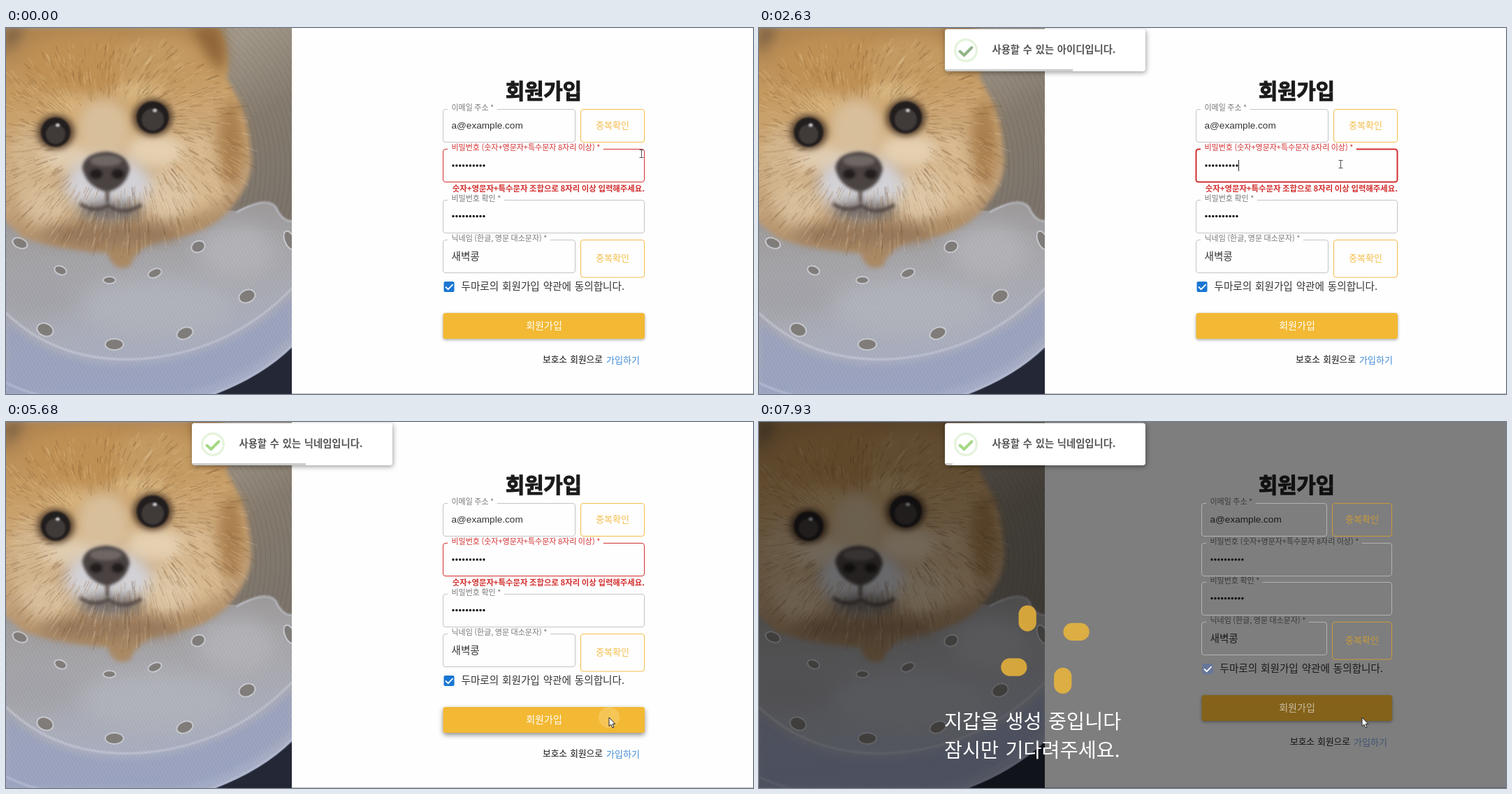
These frames come from a looping animation (1069x524 px, 8000 ms). An HTML page with a canvas:

```html
<!DOCTYPE html>
<html lang="ko">
<head>
<meta charset="utf-8">
<title>회원가입</title>
<style>
html, body { margin: 0; width: 100%; height: 100%; overflow: hidden; background: #fefefe; }
canvas { display: block; }
</style>
</head>
<body>
<canvas id="stage" width="1069" height="524"></canvas>
<script>
const W = 1069, H = 524, LOOP = 8000, TAU = Math.PI * 2;
const ctx = document.getElementById('stage').getContext('2d');
const KR = '"Noto Sans CJK KR", "Noto Sans CJK", sans-serif';
const LATIN = '"Liberation Sans", Arial, sans-serif';

const CLICK_MAIL = 930, CLICK_NICK = 3660, CLICK_JOIN = 5600;
const TOASTS = [
  { at: 1096, text: '사용할 수 있는 아이디입니다.' },
  { at: 3845, text: '사용할 수 있는 닉네임입니다.' }
];
const TOAST_LIFE = 4248, FOCUS = 2200, BLUR = CLICK_NICK, DIM_AT = 5820, WAIT_AT = 5960;

const LIGHT = {
  bg: '#fefefe', left: 625, right: 914, mid: 815, shift: 0, line: '#c4c4c4', label: '#777',
  ink: '#333', title: '#1b1b1b', gold: '#f3bd4a', join: '#f3b934', joinText: '#fff',
  error: '#d32f2f', box: '#1976d2', link: '#3f8bd6'
};
const DIM = {
  bg: '#7f7f7f', left: 633, right: 906, mid: 813, shift: -17, line: '#b2b2b2', label: '#383838',
  ink: '#1a1a1a', title: '#111', gold: '#c99a3a', join: '#84621a', joinText: '#c9bfa8',
  box: '#66779c', link: '#3f5473'
};

const clamp = (v, a = 0, b = 1) => Math.min(b, Math.max(a, v));
const mix = (a, b, p) => a + (b - a) * p;
const smooth = p => { p = clamp(p); return p * p * (3 - 2 * p); };

function bezier(x1, y1, x2, y2) {
  const at = (a, b, u) => 3 * a * u * (1 - u) ** 2 + 3 * b * u * u * (1 - u) + u ** 3;
  return x => {
    let lo = 0, hi = 1;
    for (let i = 0; i < 18; i++) {
      const m = (lo + hi) / 2;
      if (at(x1, x2, m) < x) lo = m; else hi = m;
    }
    return at(y1, y2, lo);
  };
}
const ease = bezier(.25, .1, .25, 1);
const easeInOut = bezier(.4, 0, .2, 1);

function label(str, x, y, size, weight, color, align = 'left', family = KR) {
  ctx.font = `${weight} ${size}px ${family}`;
  ctx.wordSpacing = size > 12 ? `${size * .11}px` : '0px';
  ctx.textAlign = align;
  ctx.fillStyle = color;
  ctx.fillText(str, x, y);
}

function box(c, x, y, w, h, r) {
  c.beginPath();
  c.roundRect(x, y, w, h, r);
}

function oval(c, x, y, rx, ry, color, turn = 0) {
  c.fillStyle = color;
  c.beginPath();
  c.ellipse(x, y, rx, ry, turn, 0, TAU);
  c.fill();
}

function shadow(color, blur, dx, dy) {
  ctx.shadowColor = color;
  ctx.shadowBlur = blur;
  ctx.shadowOffsetX = dx;
  ctx.shadowOffsetY = dy;
}

// Soft portrait of the dog in its plastic cone, painted once.
function paintPhoto() {
  const cv = document.createElement('canvas');
  cv.width = 409;
  cv.height = H;
  const c = cv.getContext('2d');
  let seed = 7;
  const rnd = () => (seed = seed * 16807 % 2147483647) / 2147483647;
  const blur = n => { c.filter = n ? `blur(${n}px)` : 'none'; };
  const shape = (d, color) => { c.fillStyle = color; c.fill(new Path2D(d)); };
  const ramp = (x0, y0, x1, y1, ...cols) => {
    const g = c.createLinearGradient(x0, y0, x1, y1);
    cols.forEach((k, i) => g.addColorStop(i / (cols.length - 1), k));
    return g;
  };

  c.fillStyle = ramp(290, 40, 410, 230, '#a2988a', '#857b6e', '#7d756c');
  c.fillRect(0, 0, 410, H);
  c.lineWidth = 1;
  c.strokeStyle = 'rgba(60,52,45,.14)';
  for (let i = 0; i < 26; i++) {
    c.beginPath();
    c.arc(150, 200, 180 + i * 7, -1.2, .3);
    c.stroke();
  }

  shape('M0 240 L330 262 Q372 242 386 256 Q396 278 410 276 V524 H0 Z',
    ramp(120, 270, 150, 524, '#9c9999', '#a5a4a8', '#a8abb8', '#a3abc4'));
  blur(14);
  oval(c, 330, 320, 55, 40, '#b0afb4');
  oval(c, 215, 400, 110, 40, '#aeb0b8');
  oval(c, 40, 380, 60, 35, '#a0a0a6');
  blur(5);
  shape('M0 418 Q75 490 190 482 Q320 472 410 384 V440 Q340 505 250 524 H0 Z', 'rgba(148,157,187,.75)');
  blur(1);
  c.strokeStyle = 'rgba(205,209,220,.7)';
  c.lineWidth = 2.5;
  c.stroke(new Path2D('M0 408 Q75 480 190 474 Q320 465 410 372'));
  c.stroke(new Path2D('M330 264 Q372 240 386 256 Q396 278 410 276'));
  blur(0);
  c.strokeStyle = 'rgba(235,240,250,.12)';
  c.lineWidth = 1;
  for (let i = -60; i < 120; i++) {
    c.beginPath();
    c.moveTo(i * 5, 290);
    c.lineTo(i * 5 + 120, H);
    c.stroke();
  }
  shape('M300 524 Q368 498 410 456 V524 Z', '#232736');
  blur(1);
  c.strokeStyle = '#b3bad0';
  c.lineWidth = 3;
  c.stroke(new Path2D('M0 508 Q25 520 50 526 M290 526 Q365 498 410 454'));
  blur(0);
  [[78, 347, 9, 6], [148, 361, 9, 5], [213, 351, 10, 6], [275, 313, 10, 8], [345, 384, 12, 9],
    [256, 437, 12, 8], [155, 453, 13, 8], [56, 432, 12, 9], [406, 304, 7, 14], [20, 308, 11, 7]
  ].forEach(([x, y, rx, ry]) => {
    const turn = x > 200 ? -.4 : x < 100 ? .4 : 0;
    oval(c, x, y, rx + 1, ry + 1, '#c6c8ce', turn);
    oval(c, x, y, rx - 1, ry - 1, '#807c79', turn);
  });

  blur(3);
  shape('M-10 0 H305 Q322 35 316 72 Q346 120 350 180 Q355 215 328 250 Q300 292 235 302 Q190 306 178 340 Q155 352 145 322 Q70 316 25 300 L-10 270 Z',
    ramp(100, 0, 140, 320, '#b28650', '#c59a61', '#cca878', '#c3a27c', '#a98964'));
  blur(9);
  shape('M0 0 H30 Q12 14 0 44 Z', '#705a44');
  shape('M262 -5 H305 Q322 35 308 66 Q284 38 262 -5 Z', '#8f6639');
  oval(c, 120, 50, 90, 40, '#bf9054');
  oval(c, 215, 48, 60, 34, '#c39a62');
  oval(c, 92, 112, 34, 16, '#d5b07a');
  oval(c, 190, 92, 36, 16, '#d6b47f');
  oval(c, 38, 200, 34, 58, '#d1b48d');
  oval(c, 270, 205, 52, 58, '#d6b78e');
  oval(c, 322, 165, 18, 62, '#a97f4e');
  oval(c, 140, 145, 38, 44, '#d8bf9b');
  oval(c, 88, 185, 38, 22, '#e0ccb0');
  oval(c, 212, 176, 42, 26, '#e4cfb0');
  oval(c, 230, 240, 42, 34, '#dcc5a4');
  oval(c, 60, 255, 36, 28, '#d6bd9a');
  oval(c, 150, 296, 100, 14, '#94765a');
  oval(c, 146, 225, 62, 42, '#d2d1d6');
  oval(c, 150, 262, 46, 13, '#6c6664');
  blur(0);

  // Fur strands fan out from the muzzle.
  const tones = ['rgba(98,66,34,', 'rgba(240,218,180,', 'rgba(172,126,74,'];
  for (let i = 0; i < 1500; i++) {
    const a = rnd() * TAU, d = .45 + rnd() * .58, n = 6 + rnd() * 14;
    const x = 155 + Math.cos(a) * 186 * d, y = 165 + Math.sin(a) * 142 * d;
    c.strokeStyle = tones[i % 3] + '.2)';
    c.lineWidth = .8 + rnd();
    c.beginPath();
    c.moveTo(x, y);
    c.lineTo(x + Math.cos(a + .2) * n, y + Math.sin(a + .2) * n + 3);
    c.stroke();
  }

  [[71, 149, 23], [210, 128, 25]].forEach(([x, y, r]) => {
    blur(4);
    oval(c, x, y, r + 4, r + 2, '#5d4733');
    blur(1);
    oval(c, x, y, r - 2, r - 2, '#221e1e');
    oval(c, x, y + 3, r - 9, r - 9, '#403a39');
    oval(c, x + 3, y - 10, 3, 2.5, '#c9c9cd');
  });
  blur(2);
  shape('M109 200 Q112 179 144 177 Q174 180 177 202 Q172 228 145 235 Q115 228 109 200 Z', '#4b4342');
  oval(c, 143, 190, 23, 8, '#6e6764');
  oval(c, 129, 209, 9, 7, '#221d1d');
  oval(c, 160, 209, 9, 7, '#221d1d');
  c.strokeStyle = '#4a403d';
  c.lineWidth = 4;
  c.stroke(new Path2D('M145 233 V250 M106 252 Q128 266 146 254 Q168 270 194 253'));
  blur(0);
  return cv;
}
const photo = paintPhoto();

function field(x, y, right, name, k, color, thick = 1) {
  ctx.strokeStyle = color;
  ctx.lineWidth = thick;
  box(ctx, x + .5, y + .5, right - x - 1, 47, 3.5);
  ctx.stroke();
  ctx.font = `300 11px ${KR}`;
  ctx.wordSpacing = '0px';
  ctx.fillStyle = k.bg;
  ctx.fillRect(x + 7, y - 2, ctx.measureText(name).width + 10, 5);
  label(name, x + 12.5, y + 2, 11, 300, color === k.line ? k.label : color);
}

function dots(x, y, color) {
  for (let i = 0; i < 10; i++) oval(ctx, x + 2 + i * 4.88, y, 1.7, 1.7, color);
}

// Expanding press circle, clipped to the current path.
function ripple(t, start, x, y, radius, color) {
  const age = t - start;
  if (age < 0 || age > 800) return;
  const p = easeInOut(clamp(age / 550));
  ctx.save();
  ctx.clip();
  ctx.globalAlpha = mix(.16, .28, p) * (1 - smooth((age - 300) / 500));
  oval(ctx, x, y, radius * p, radius * p, color);
  ctx.restore();
}

function checkButton(k, y, h, t, start, px, py) {
  const x = k.mid + 7.5, w = k.right - x - .5;
  box(ctx, x, y + .5, w, h, 3.5);
  ripple(t, start, px, py, 58, k.gold);
  ctx.strokeStyle = k.gold;
  ctx.lineWidth = 1;
  box(ctx, x, y + .5, w, h, 3.5);
  ctx.stroke();
  label('중복확인', x + w / 2, y + h / 2 + 4.5, 13, 300, k.gold, 'center');
}

function form(k, t) {
  const { left: l, right: r, shift: s } = k;
  const focused = !s && t >= FOCUS && t < BLUR;
  label('회원가입', 769.5, 100.5, 29.6, 900, k.title, 'center');
  ctx.strokeStyle = k.title;
  ctx.lineWidth = 1.1;
  ctx.strokeText('회원가입', 769.5, 100.5);

  field(l, 116, k.mid, '이메일 주소 *', k, k.line);
  label('a@example.com', l + 12.5, 144, 13.6, 400, k.ink, 'left', LATIN);
  checkButton(k, 116, 47, t, CLICK_MAIL, 872, 139);

  field(l, 173, r, '비밀번호 (숫자+영문자+특수문자 8자리 이상) *', k, k.error || k.line, focused ? 2 : 1);
  dots(l + 13, 197, '#111');
  if (focused && (t - FOCUS) % 1000 < 500) {
    ctx.fillStyle = '#222';
    ctx.fillRect(686, 189, 1, 16);
  }
  if (k.error) label('숫자+영문자+특수문자 조합으로 8자리 이상 입력해주세요.', r, 234, 11.4, 700, k.error, 'right');

  field(l, 246 + s, r, '비밀번호 확인 *', k, k.line);
  dots(l + 13, 269.5 + s, '#111');

  field(l, 303 + s, k.mid, '닉네임 (한글, 영문 대소문자) *', k, k.line);
  label('새벽콩', l + 12.5, 332 + s, 14.6, 300, k.ink);
  checkButton(k, 303 + s, 53.5, t, CLICK_NICK, 863, 325);

  ctx.fillStyle = k.box;
  box(ctx, l + 1.5, 363 + s, 15, 15, 2);
  ctx.fill();
  ctx.strokeStyle = '#fff';
  ctx.lineWidth = 1.8;
  ctx.stroke(new Path2D(`M${l + 4} ${370.5 + s} l3.7 3.7 l6.8 -7`));
  label('두마로의 회원가입 약관에 동의합니다.', l + 26.5, 374.5 + s, 14.6, 300, k.ink);

  const hover = !s && t > 4950;
  ctx.save();
  shadow(hover ? 'rgba(0,0,0,.45)' : 'rgba(0,0,0,.35)', hover ? 7 : 4, 0, hover ? 3 : 1.5);
  ctx.fillStyle = k.join;
  box(ctx, l + .5, 408 + s, r - l - .5, 37, 3.5);
  ctx.fill();
  ctx.restore();
  ripple(t, CLICK_JOIN, 863, 423, 240, '#fff');
  label('회원가입', 770, 430.5 + s, 14, 300, k.joinText, 'center');

  label('보호소 회원으로', r - 146, 479 + s, 12.7, 500, '#111');
  label('가입하기', r - 55, 479.5 + s, 13, 300, k.link);
}

function toast({ at, text }, t) {
  const age = t - at, p = clamp(age / 500) * 3;
  const seg = Math.min(2, Math.floor(p)), e = ease(p - seg);
  const angles = [2, -2, 2, 0], drops = [-8.5, 0, 4.25, 0];
  ctx.save();
  ctx.translate(409.5, 31.5 + mix(drops[seg], drops[seg + 1], e));
  ctx.rotate(mix(angles[seg], angles[seg + 1], e) * Math.PI / 180);
  ctx.translate(-409.5, -31.5);

  ctx.save();
  shadow('rgba(0,0,0,.38)', 7, 1, 2);
  ctx.fillStyle = '#fff';
  box(ctx, 266, 1.5, 287, 60.5, 4);
  ctx.fill();
  ctx.restore();

  ctx.save();
  box(ctx, 266, 1.5, 287, 60.5, 4);
  ctx.clip();
  ctx.fillStyle = 'rgba(0,0,0,.2)';
  ctx.fillRect(266, 59, 287 * clamp(1 - age / TOAST_LIFE), 3);
  ctx.restore();

  ctx.strokeStyle = '#e4f3db';
  ctx.lineWidth = 3.2;
  ctx.beginPath();
  ctx.arc(296, 32, 15.4, 0, TAU);
  ctx.stroke();

  const tip = smooth((age - 405) / 120), long = smooth((age - 500) / 150);
  if (tip > 0) {
    ctx.strokeStyle = at < 2000 && t > 1800 ? '#90b588' : '#a5d886';
    ctx.lineWidth = 4;
    ctx.lineCap = 'round';
    ctx.beginPath();
    ctx.moveTo(287.5, 33.5);
    ctx.lineTo(mix(287.5, 293.5, tip), mix(33.5, 39, tip));
    if (long > 0) ctx.lineTo(mix(293.5, 304.5, long), mix(39, 28, long));
    ctx.stroke();
    ctx.lineCap = 'butt';
  }
  label(text, 333.5, 36, 14.3, 700, '#565656');
  ctx.restore();
}

// Four pills travel around a five by five grid, each a quarter turn apart.
function spinner(t) {
  const cell = 25.3, route = [[0, 1], [1, 1], [1, 0], [3, 0]];
  const k = (((t - 7160) / 486) % 1 + 1) % 1 * 3;
  const seg = Math.min(2, Math.floor(k)), f = k - seg;
  const spot = p => [0, 1].map(i => (mix(route[seg][i], route[seg + 1][i], p) - 2) * cell);
  const tail = spot(smooth(2 * f - 1)), head = spot(smooth(2 * f));
  ctx.save();
  ctx.translate(409.5, 325.7);
  ctx.strokeStyle = 'rgba(241,185,55,.82)';
  ctx.lineWidth = cell;
  ctx.lineCap = 'round';
  for (let i = 0; i < 4; i++) {
    ctx.beginPath();
    ctx.moveTo(...tail);
    ctx.lineTo(head[0] + .01, head[1]);
    ctx.stroke();
    ctx.rotate(Math.PI / 2);
  }
  ctx.restore();
}

const MOVES = [
  [0, 909, 180], [70, 909, 180], [320, 945, 166], [660, 872, 140], [1350, 872, 140], [1720, 852, 182],
  [2150, 832, 195], [2680, 832, 195], [3340, 863, 324], [4280, 863, 324], [4620, 942, 382],
  [5020, 872, 426], [5300, 863, 423], [LOOP, 863, 423]
];

function cursor(t) {
  const i = MOVES.findIndex(m => m[0] > t), a = MOVES[i - 1], b = MOVES[i];
  const p = smooth((t - a[0]) / (b[0] - a[0]));
  const x = mix(a[1], b[1], p), y = mix(a[2], b[2], p);
  const inside = (l, top, r, bottom) => x > l && x < r && y > top && y < bottom;
  ctx.save();
  ctx.translate(Math.round(x), Math.round(y));
  ctx.lineJoin = 'round';
  ctx.strokeStyle = '#222';
  ctx.fillStyle = '#fff';
  ctx.lineWidth = 1;
  if (inside(626, 173, 914, 221) || inside(626, 246, 914, 294)) {
    ctx.strokeStyle = '#555';
    ctx.stroke(new Path2D('M-2.5 -5.5 H3.5 M.5 -5 V5 M-2.5 5.5 H3.5'));
  } else if (inside(822, 116, 914, 164) || inside(822, 303, 914, 357)) {
    const hand = new Path2D('M-2 1 Q0 -1.5 2 1 V6 Q4 5 5 7 Q7 6 7.5 8 Q9.5 7.5 9.5 10 V13 Q9 15 8 17 H0 Q-2 14 -5 10.5 Q-5 8.5 -2 10 Z');
    ctx.fill(hand);
    ctx.stroke(hand);
    ctx.stroke(new Path2D('M2 6 V9 M5 7 V9.5 M7.5 8 V10'));
  } else {
    const arrow = new Path2D('M0 0 V12.5 L2.9 10 L5 14.8 L7 14 L5 9.3 H8.8 Z');
    ctx.fill(arrow);
    ctx.stroke(arrow);
  }
  ctx.restore();
}

function draw(t) {
  const dim = t >= DIM_AT;
  ctx.fillStyle = LIGHT.bg;
  ctx.fillRect(0, 0, W, H);
  ctx.drawImage(photo, 0, 0);
  ctx.fillStyle = '#bdbdbd';
  ctx.fillRect(409, 523, W - 409, 1);
  if (dim) {
    ctx.fillStyle = 'rgba(0,0,0,.5)';
    ctx.fillRect(0, 0, W, H);
  }
  form(dim ? DIM : LIGHT, t);
  if (dim) spinner(t);
  if (t >= WAIT_AT) {
    label('지갑을 생성 중입니다', 265, 438.5, 28.3, 500, '#fff');
    label('잠시만 기다려주세요.', 265, 479.5, 28.3, 500, '#fff');
  }
  const shown = TOASTS.filter(n => t >= n.at).pop();
  if (shown) toast(shown, t);
  cursor(t);
}

const begin = performance.now();
function tick() {
  draw((performance.now() - begin) % LOOP);
  requestAnimationFrame(tick);
}
tick();
</script>
</body>
</html>
```
